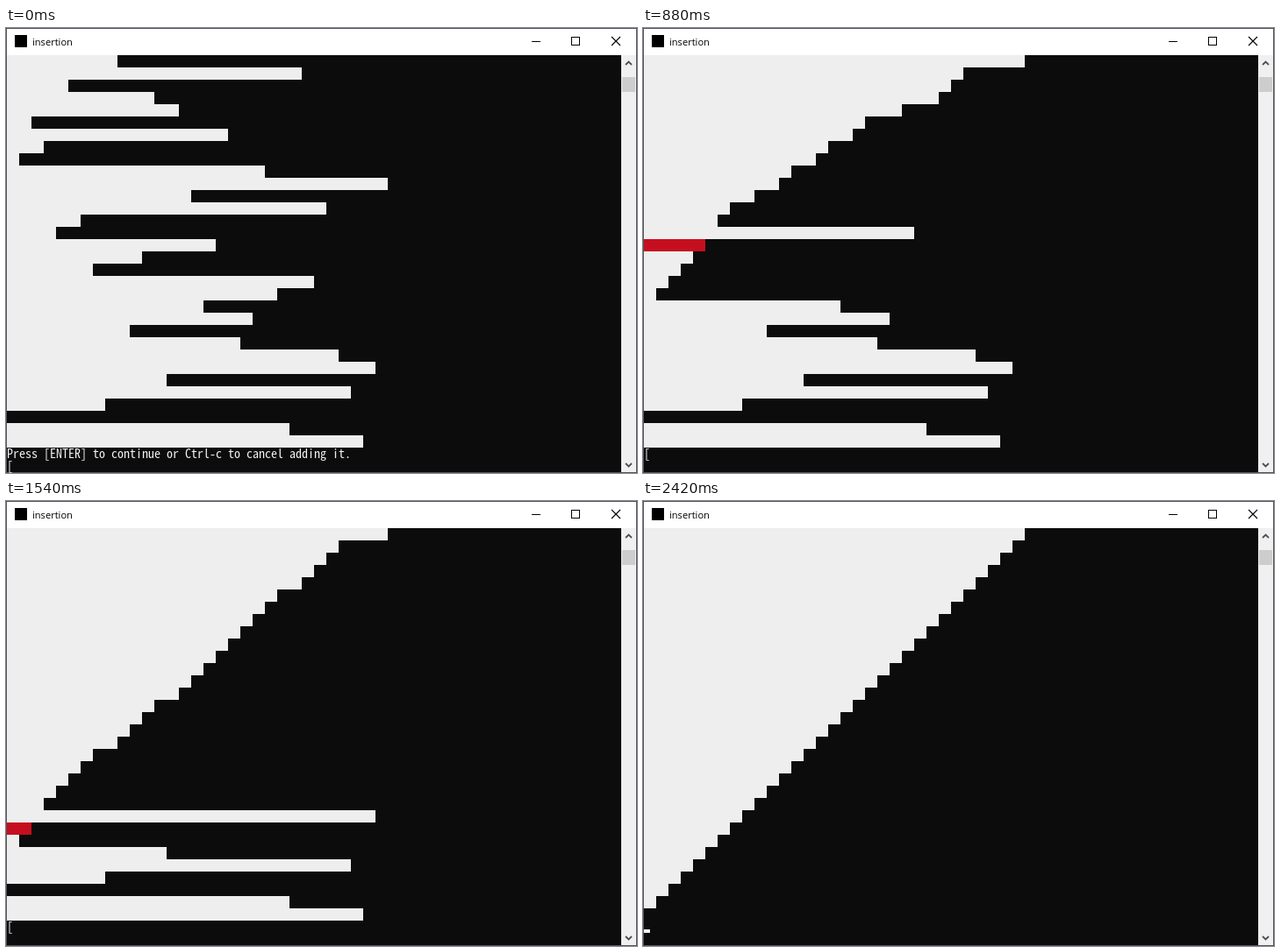
Write an HTML page that moves like this. It is 719 by 508 pixels and loops after 2.6 s.

```html
<!DOCTYPE html>
<html lang="en">
<head>
<meta charset="utf-8">
<title>insertion</title>
<style>
html, body { margin: 0; width: 100%; height: 100%; overflow: hidden; background: #0c0c0c; }
svg { display: block; width: 719px; height: 508px; }
.crisp { shape-rendering: crispEdges; }
.title { font: 11.1px "Open Sans", "Noto Sans", sans-serif; fill: #000; }
.console { font-family: "Noto Sans Mono CJK JP", "Liberation Mono", monospace; fill: #f2f2f2; white-space: pre; }
</style>
</head>
<body>
<svg viewBox="0 0 719 508" xmlns="http://www.w3.org/2000/svg">
  <g class="crisp">
    <rect width="719" height="508" fill="#50535f"/>
    <rect x="1" y="1" width="717" height="30" fill="#fff"/>
    <rect x="1" y="31" width="700" height="476" fill="#0c0c0c"/>
    <rect x="701" y="31" width="17" height="476" fill="#f0f0f0"/>
    <rect x="702" y="56" width="15" height="17" fill="#cdcdcd"/>
    <rect x="10" y="8" width="14" height="14" fill="#000"/>
    <path d="M599 15.5h10M644.5 10.5h9v9h-9z" fill="none" stroke="#000"/>
  </g>
  <path d="M690 10l10 10M700 10l-10 10" stroke="#000" stroke-width="1.1"/>
  <path d="M706 42l3.5-3.5 3.5 3.5M706 497l3.5 3.5 3.5-3.5" fill="none" stroke="#505050" stroke-width="1.8"/>
  <text class="title" x="30" y="20">insertion</text>
  <g id="bars" class="crisp"></g>
  <g class="console">
    <text id="prompt" x="1" y="491">Press [ENTER] to continue or Ctrl-c to cancel adding it.</text>
    <text id="bracket" x="1" y="491">[</text>
  </g>
  <rect id="cursor" class="crisp" x="1" y="489" width="7" height="4" fill="#f2f2f2"/>
</svg>
<script>
const LOOP = 2600, TICK = 20, START = 60, END = 2420;
const CELL = 14, LEFT = 1, TOP = 31;
const VALUES = [9, 24, 5, 12, 14, 2, 18, 3, 1, 21, 31, 15, 26, 6, 4, 17,
                11, 7, 25, 22, 16, 20, 10, 19, 27, 30, 13, 28, 8, 0, 23, 29];
// Sorting progress: [time, redraws finished]
const PACE = [[60, 1], [300, 34], [680, 89], [1100, 149], [1540, 210], [2080, 285.8], [2420, 334]];

const $ = id => document.getElementById(id);
const prompt = $('prompt'), bracket = $('bracket'), cursor = $('cursor');

// Every redraw of a descending insertion sort, with its marked row
function sortSteps(values) {
  const list = values.slice(), steps = [];
  const save = mark => steps.push({ list: list.slice(), mark });
  save(-1);
  for (let i = 1; i < list.length; i++) {
    save(i);
    for (let j = i; j > 0 && list[j - 1] < list[j]; j--) {
      [list[j - 1], list[j]] = [list[j], list[j - 1]];
      save(j);
    }
  }
  save(-1);
  return steps;
}

const steps = sortSteps(VALUES);

const bars = VALUES.map((_, row) => {
  const bar = document.createElementNS('http://www.w3.org/2000/svg', 'rect');
  bar.setAttribute('x', LEFT);
  bar.setAttribute('y', TOP + row * CELL);
  bar.setAttribute('height', CELL);
  $('bars').append(bar);
  return bar;
});

// Console cells are half as wide as they are high
function fitConsole() {
  const pen = document.createElement('canvas').getContext('2d');
  pen.font = '14px ' + getComputedStyle(prompt).fontFamily;
  const size = 14 * (CELL / 2) / (pen.measureText('M'.repeat(50)).width / 50);
  prompt.parentNode.style.fontSize = size + 'px';
}

function progress(t) {
  if (t < START) return 0;
  if (t >= END) return steps.length - 1;
  const k = PACE.findIndex(p => p[0] > t);
  const [t0, a] = PACE[k - 1], [t1, b] = PACE[k];
  return a + (b - a) * (t - t0) / (t1 - t0);
}

function draw(time) {
  const t = Math.floor((time % LOOP) / TICK) * TICK;
  const pos = progress(t), n = Math.floor(pos);
  // The console repaints from the top, so lower rows may lag one step
  const painted = (pos - n) * bars.length;
  bars.forEach((bar, row) => {
    const { list, mark } = steps[row < painted ? n + 1 : n];
    bar.setAttribute('width', list[row] * CELL);
    bar.setAttribute('fill', row === mark ? '#c50f1f' : '#eeeeee');
  });
  const waiting = t < START, done = t >= END;
  prompt.style.display = waiting ? '' : 'none';
  bracket.style.display = done ? 'none' : '';
  bracket.setAttribute('y', waiting ? 505 : 491);
  cursor.style.display = done ? '' : 'none';
}

fitConsole();
const begin = performance.now();
function frame() {
  draw(performance.now() - begin);
  requestAnimationFrame(frame);
}
draw(0);
requestAnimationFrame(frame);
</script>
</body>
</html>
```
